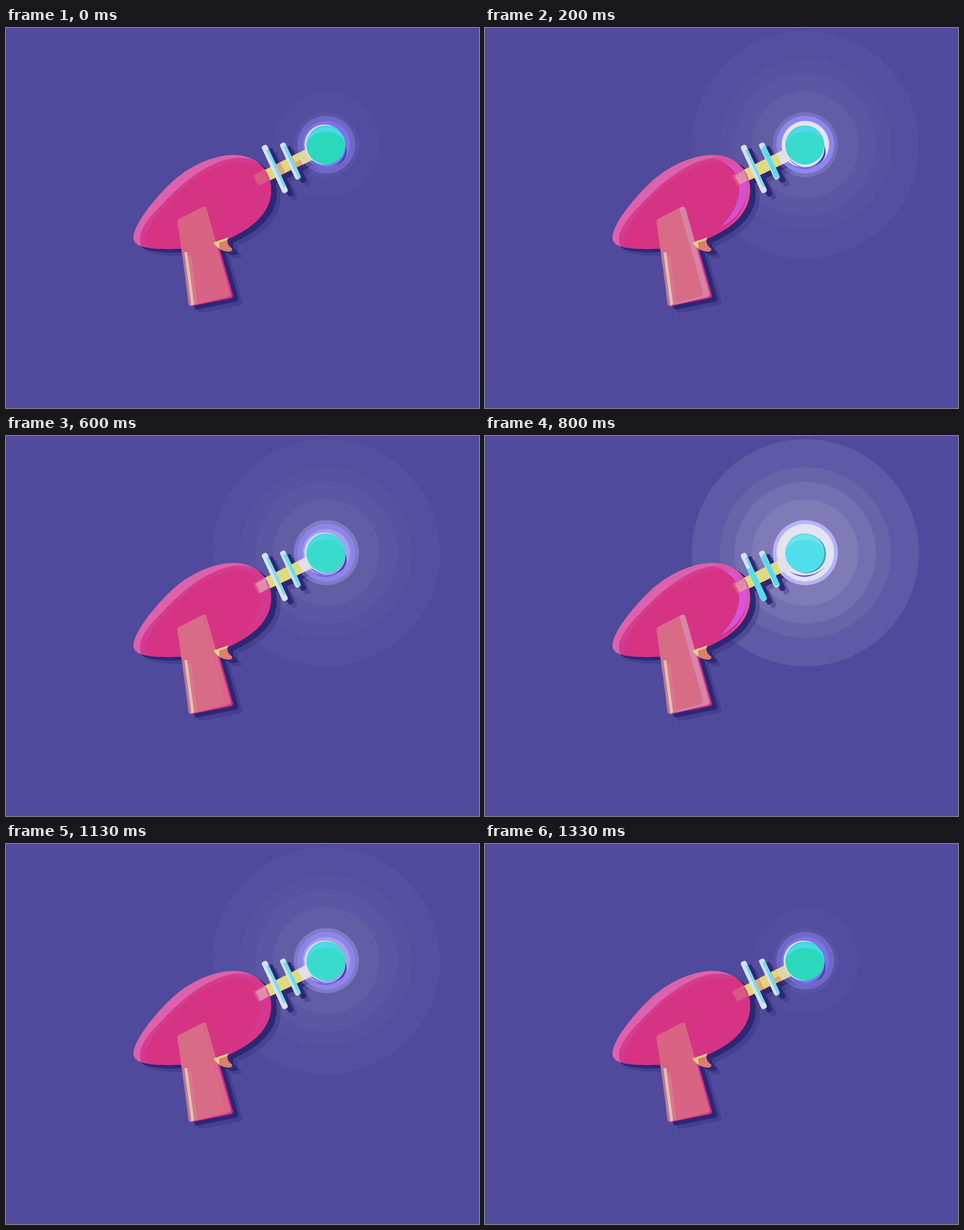
An HTML page that plays this animation: 835 by 671 pixels, repeating every 2.33 s.

```html
<!DOCTYPE html>
<html lang="en">
<head>
<meta charset="utf-8">
<title>Ray gun</title>
<style>
  html, body { margin: 0; width: 100%; height: 100%; overflow: hidden; background: #4f4a9c; }
  svg { display: block; width: 100%; height: 100%; }
  .halo { fill: #fff; opacity: var(--halo); }
  .rim { opacity: var(--rim); }
  .ring { opacity: var(--ring); }
  .white { opacity: var(--white); }
  .full { opacity: var(--full); }
  .edge { opacity: var(--edge); }
  .warm { opacity: var(--warm); }
  .pulse { opacity: var(--pulse); }
  .dim { opacity: calc(1 - var(--full)); }
</style>
</head>
<body>
<svg id="stage" viewBox="0 0 835 671">
  <defs>
    <path id="body" d="M225 370C225 348 259 303 297 268C332 238 372 224 402 224C440 224 468 250 468 286C468 322 441 351 393 372C365 384 338 390 300 390C280 391 258 390 241 386C231 384 225 378 225 370Z"/>
    <path id="grip" d="M310 388L322 486Q323 492 328 491L397 477Q402 475 400 470L376 386Z"/>
    <path id="barrel" d="M456 251L531 213L541 233L464 270Z"/>
    <rect id="fin1" x="-5.2" y="-46" width="10.4" height="92" rx="4" transform="translate(474.5 249) rotate(-25)"/>
    <rect id="fin2" x="-5.2" y="-35" width="10.4" height="70" rx="4" transform="translate(502 235) rotate(-25)"/>
    <path id="trigger" d="M366 379L392 370Q388 382 399 389Q401 394 394 395Q376 394 366 379Z"/>
    <path id="cap" d="M531 203A34.5 34.5 0 0 1 599 203Q590 183 565 183Q542 184 531 203Z"/>
    <g id="shape">
      <use href="#body"/><use href="#grip"/><use href="#barrel"/>
      <use href="#fin1"/><use href="#fin2"/><use href="#trigger"/>
    </g>
    <clipPath id="inBody"><use href="#body"/></clipPath>
    <clipPath id="inFins"><use href="#fin1"/><use href="#fin2"/></clipPath>
  </defs>

  <!-- wide halo -->
  <g transform="translate(565.5 206)">
    <g class="halo">
      <circle r="200.5" opacity=".09"/>
      <circle r="151" opacity=".06"/>
      <circle r="125" opacity=".07"/>
      <circle r="94" opacity=".07"/>
    </g>
    <circle r="94" fill="#fff" opacity=".014"/>
  </g>

  <!-- shadows -->
  <use href="#shape" x="17" y="12" fill="#37317f" opacity=".4"/>
  <use href="#shape" x="10" y="6" fill="#2d2775"/>

  <!-- glow rings -->
  <g transform="translate(565.5 206)">
    <circle class="rim" r="57.5" fill="#b7b2f6"/>
    <circle class="ring" r="51" fill="#8f87f0"/>
    <circle class="full" r="51" fill="#e3e2f0"/>
    <circle class="dim" r="42" fill="#7b74ea"/>
    <circle class="white" r="42" fill="#e6e4f0"/>
  </g>

  <!-- barrel -->
  <use href="#barrel" fill="#dfa777"/>
  <path fill="#e0d67c" d="M456 251L468 245L476 264L464 270ZM484 237L498 230L502 249L493 256ZM505 226L517 220L521 232L511 237Z"/>
  <use class="warm" href="#barrel" fill="#dfd97f"/>
  <path fill="#dcd8a5" d="M514 222L531 213L541 233L524 241Z"/>
  <path class="warm" fill="#e2dfe8" d="M514 222L531 213L541 233L524 241Z"/>

  <!-- bulb -->
  <path class="dim" fill="#4a42b2" d="M537 231A34 34 0 0 0 599 208Q607 228 588 241Q560 255 537 231Z"/>
  <path fill="#7067dc" d="M537 239Q567 262 600 232Q570 256 537 239Z"/>
  <circle cx="562.5" cy="206" r="35.5" fill="#e2e1f0"/>
  <circle class="full" cx="567.5" cy="208" r="34.5" fill="#429eb9"/>
  <circle cx="564.7" cy="206.7" r="34.5" fill="#2cd8bc"/>
  <circle class="pulse" cx="564.7" cy="206.7" r="34.5" fill="#51deeb"/>
  <use href="#cap" fill="#4fd8e8"/>
  <use class="full" href="#cap" fill="#72e2ee"/>

  <!-- fins -->
  <use href="#fin1" fill="#dcdfee"/>
  <use href="#fin2" fill="#dcdfee"/>
  <g clip-path="url(#inFins)" stroke="#74dbe9" stroke-width="6">
    <path d="M462 214L493 280M492 208L521 269"/>
    <path class="full" stroke="#55dde9" stroke-width="10" d="M467 233L494 290"/>
    <path class="edge" stroke="#55dde9" stroke-width="8" d="M491 212L516 264"/>
  </g>

  <!-- body -->
  <g clip-path="url(#inBody)">
    <use href="#body" fill="#dd61ab"/>
    <path fill="#d53b90" d="M242 392C229 370 239 348 274 313C319 263 370 230 410 229C435 229 455 238 472 256L480 400Z"/>
    <path fill="#d63384" d="M247 392C238 372 255 340 290 304C325 267 375 238 412 237C435 236 448 238 472 252L480 400Z"/>
    <g class="edge">
      <path fill="#df559f" d="M402 224C440 224 468 250 468 286C468 320 440 350 417 358C450 340 463 310 463 280C462 255 440 236 402 230Z"/>
      <path fill="#d555dc" d="M415 234C447 240 463 258 463 282C462 312 446 337 416 351C436 332 449 309 449 282C449 260 437 245 415 234Z"/>
    </g>
  </g>
  <path fill="#d95785" d="M436 261L456 249L464 269L446 279Z"/>
  <path class="warm" fill="#e08cae" d="M441 261L457 251L464 269L449 277Z"/>

  <!-- grip -->
  <use href="#grip" fill="#d63086"/>
  <path fill="#d96382" d="M303 344Q302 339 306 337L347 316Q352 314 354 319L396 468Q398 473 392 475L332 489Q324 491 323 486Z"/>
  <path class="warm" fill="#d86c87" d="M303 344Q302 339 306 337L345 317L385 466Q386 472 381 473L332 488L323 486Z"/>
  <path class="edge" fill="#d885aa" d="M343 318L347 316Q352 314 354 319L396 468Q398 473 392 475L332 489V487L380 474Q386 472 385 467Z"/>
  <path fill="#b9779b" d="M310.500 391L318 395L330 490Q323 492 322 486Z"/>
  <path fill="#d7788c" d="M320 404L327 403L338 487L331 489Z"/>
  <path fill="#e8bfae" d="M315 396L320 396L332 488L327 490Z"/>

  <!-- trigger -->
  <use href="#trigger" fill="#dd7d70"/>
  <path fill="#e0d480" d="M366 379L392 370L391 374L376 379L377 390Q371 386 366 379Z"/>
</svg>
<script>
  const LOOP = 2330;
  const names = ["halo", "rim", "ring", "white", "full", "edge", "warm", "pulse"];
  const off  = [0,   .06, .42, 0, 0, 0,   0, 0];
  const rise = [.36, .22, 1,  1,  0, .9,  1, .35];
  const peak = [1,   1,   1,  1,  1, 1,   1, 1];
  const fall = [.36, .35, .9, .4, 0, .15, 1, .35];
  const mid = (a, b) => a.map((v, i) => (v + b[i]) / 2);

  // Each pose is held until the next start time.
  const poses = [
    [0, off], [100, mid(off, rise)], [200, rise], [300, mid(rise, peak)],
    [400, peak], [500, mid(peak, fall)], [600, fall], [700, mid(fall, peak)],
    [800, peak], [900, mid(peak, fall)], [1000, peak], [1030, mid(peak, fall)],
    [1130, fall], [1230, mid(fall, off)], [1330, off]
  ];
  const stage = document.getElementById("stage");
  const start = performance.now();

  function draw(now) {
    const t = Math.max(0, now - start) % LOOP;
    const pose = poses.findLast(p => p[0] <= t)[1];
    names.forEach((name, i) => stage.style.setProperty("--" + name, pose[i]));
    requestAnimationFrame(draw);
  }
  draw(start);
</script>
</body>
</html>
```
